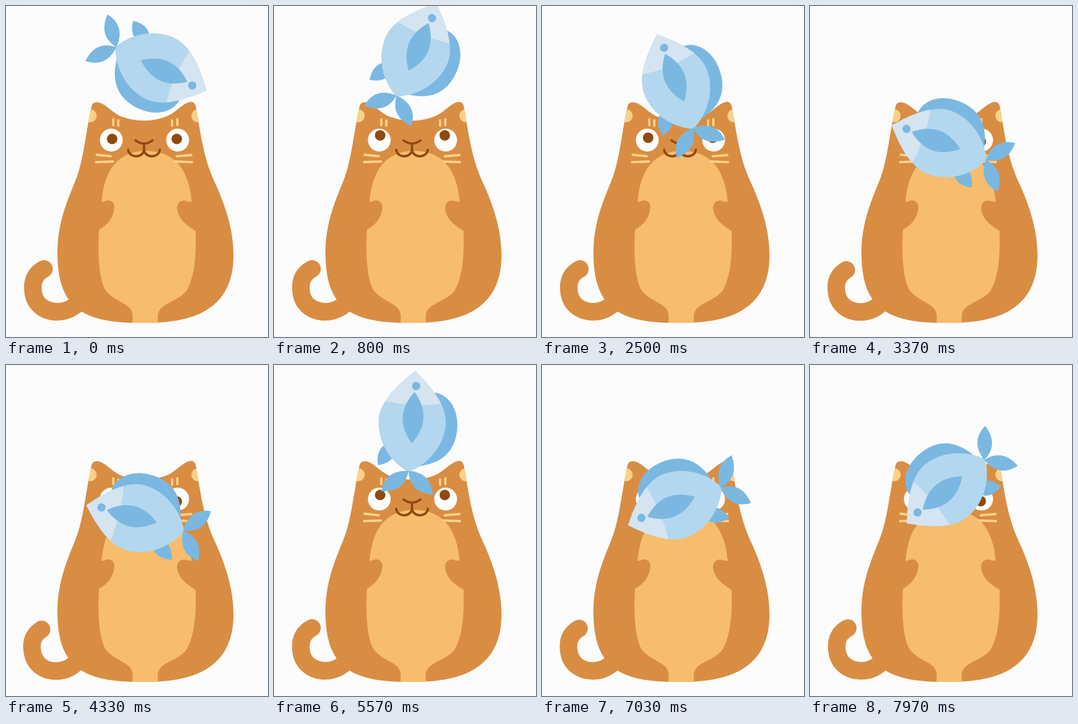
Recreate the animation shown at these times as an HTML page. Size 448x564 px, loop 8000 ms.

```html
<!DOCTYPE html>
<html lang="en">
<head>
<meta charset="utf-8">
<title>Cat tossing a fish</title>
<style>
  html, body { margin: 0; width: 100%; height: 100%; overflow: hidden; background: #fcfcfc; }
  svg { display: block; width: 100%; height: 100%; }
  .fur { fill: #d98d43; }
  .fin { fill: #7ab8e2; }
  .line { fill: none; stroke-width: 4; stroke-linecap: round; }
</style>
</head>
<body>
<svg viewBox="0 0 448 564">
  <defs>
    <path id="bodyShape" d="M146.5 170Q148.5 163 157 164C170 166 180 180 194 187C220 198 252 198 277 187C291 181 303 165 315 163.5Q322 162 324.5 171C331 205 336 253 354 294C372 332 389 377 389 425C389 514 325 540 239 540C140 541 88 522 88 421C88 375 101 340 117 302C133 265 136 215 146.5 170Z"/>
    <path id="fishShape" d="M87 0C79 -8 40 -57 0 -57C-36 -57 -70 -34 -86 0C-70 34 -36 58 0 58C40 58 79 8 87 0Z"/>
    <path id="tailFin" d="M-84 0Q-85 -40 -122 -44Q-121 -4 -84 0Z"/>
    <clipPath id="inBody"><use href="#bodyShape"/></clipPath>
    <clipPath id="inFish"><use href="#fishShape"/></clipPath>
  </defs>

  <path id="tail" class="line" stroke="#d98d43" style="stroke-width:30" d="M65 448C50 456 45 468 46 483C47 508 66 521 88 521C106 521 118 512 130 500"/>
  <use href="#bodyShape" class="fur"/>
  <g clip-path="url(#inBody)">
    <g fill="#fcd186"><circle cx="144" cy="187" r="11"/><circle cx="328" cy="187" r="11"/></g>
    <path fill="#f7bd6c" d="M163 345C164 300 178 247 240 247C302 247 317 300 318 345L324 383C326 430 321 465 308 486C296 500 276 505 266 514C258 522 259 530 260 541H216C217 530 218 522 211 514C202 505 182 500 170 484C158 462 157 420 159 380Z"/>
    <path class="fur" d="M155 335Q165 334 168 333C178 328 187 334 185 346C182 366 170 375 155 384ZM330 335L310 333C300 328 290 336 293 349C297 366 310 374 324 383L330 384Z"/>
  </g>
  <path class="line" stroke="#fcd186" d="M183.5 193V203M192 195V204M284 195V204M293 193V203M155 253.5L179 256M154 266L183 265M292 256L317 254M289 265L318 266"/>
  <g fill="#fdfdfd"><circle cx="180" cy="228.5" r="19.5"/><circle cx="293.5" cy="228.5" r="19.5"/></g>
  <g id="pupils" fill="#8f4a10"><circle cx="181.5" r="9"/><circle cx="292" r="9"/></g>
  <path class="line" stroke="#8f4a10" d="M221.5 229Q236 240 250.5 229M236 235V244M209 245A13.5 11.5 0 0 0 236 244A13.5 11.5 0 0 0 263 245"/>

  <g id="fish">
    <path class="fin" d="M-35 -25Q-42 -61 -78 -53Q-70 -17 -35 -25Z"/>
    <path class="fin" d="M52 36C50 60 26 78 -6 78C-45 78 -70 56 -76 10L0 0Z"/>
    <use href="#fishShape" fill="#b3d7ee"/>
    <path fill="#d4e4f1" clip-path="url(#inFish)" d="M34 -60Q22 0 36 60H90V-60Z"/>
    <use href="#tailFin" class="fin"/>
    <use href="#tailFin" class="fin" transform="scale(1 -1)"/>
    <path class="fin" d="M51 1Q7 37 -37 2Q7 -34 51 1Z"/>
    <circle class="fin" cx="61" cy="3" r="7"/>
  </g>
</svg>
<script>
const LOOP = 8000, TOSS = 983.3;
const el = id => document.getElementById(id);
const fish = el('fish'), pupils = el('pupils'), tail = el('tail');

// One toss: [ms, fish y, fish angle, pupil y, tail angle]
const poses = [
  [0, 105.5, 25.5, 226.5, 0],
  [104, 196, 141, 232, -0.5],
  [147, 225, 158, 233, -2],
  [280, 281, 180, 234, -8],
  [397, 257.5, 194.6, 232.5, -5],
  [420, 232, 200, 231, -3.5],
  [587, 124.5, 267, 222.5, 0],
  [654, 117, 274, 221.5, 0],
  [840, 95, 306, 221, 0]
];

// Poses repeat every toss, with the angle gaining a full turn
function pose(i) {
  const n = poses.length, turn = Math.floor(i / n);
  const [ms, y, angle, pupil, swing] = poses[i - turn * n];
  return [ms + turn * TOSS, y, angle + turn * 360, pupil, swing];
}

function slope(i, k) {
  const a = pose(i - 1), b = pose(i), c = pose(i + 1);
  const h1 = b[0] - a[0], h2 = c[0] - b[0];
  return ((b[k] - a[k]) / h1 * h2 + (c[k] - b[k]) / h2 * h1) / (h1 + h2);
}

// Cubic Hermite interpolation of column k
function sample(ms, k) {
  let i = poses.length - 1;
  while (poses[i][0] > ms) i--;
  const a = pose(i), b = pose(i + 1), h = b[0] - a[0], s = (ms - a[0]) / h;
  const blend = s * s * (3 - 2 * s);
  return a[k] + (b[k] - a[k]) * blend
    + h * s * (1 - s) * (slope(i, k) * (1 - s) - slope(i + 1, k) * s);
}

function draw(now) {
  const ms = now % LOOP % TOSS;
  const [y, angle, pupil, swing] = [1, 2, 3, 4].map(k => sample(ms, k));
  fish.setAttribute('transform', `translate(243 ${y}) rotate(${angle}) translate(20 -8.5)`);
  pupils.setAttribute('transform', `translate(0 ${pupil})`);
  tail.setAttribute('transform', `rotate(${swing} 92 497)`);
}

let start;
function tick(now) {
  start ??= now;
  draw(now - start);
  requestAnimationFrame(tick);
}
draw(0);
requestAnimationFrame(tick);
</script>
</body>
</html>
```
